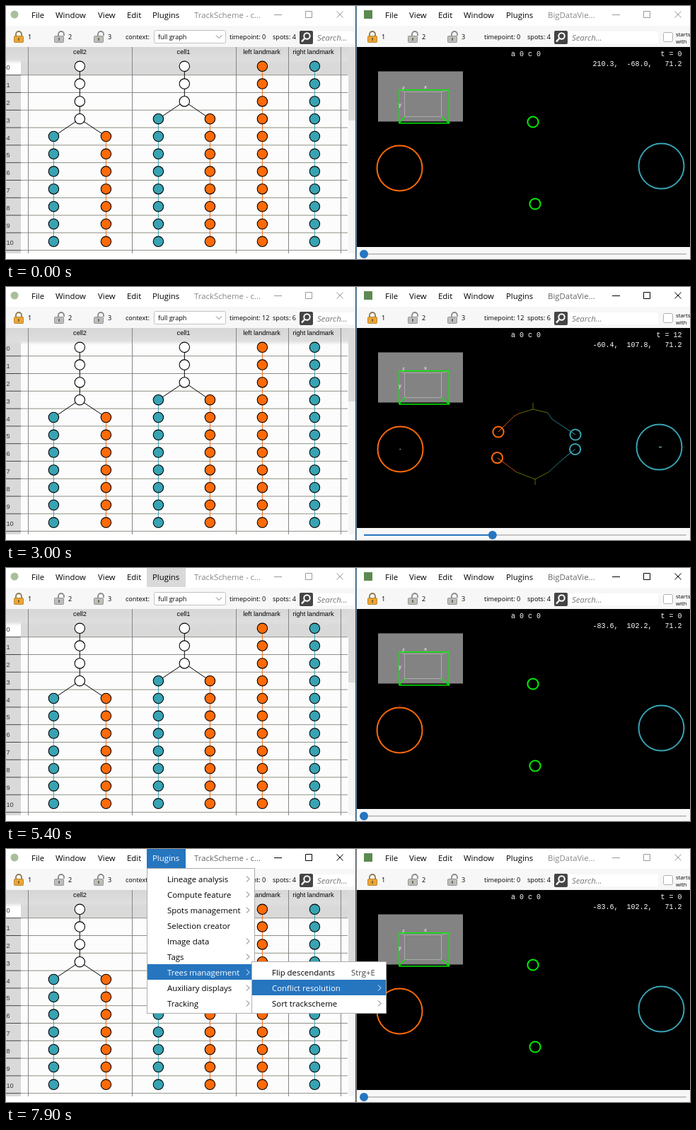
These frames come from a looping animation (967 px wide and 358 px high, 8 s). An HTML page:

```html
<!DOCTYPE html>
<html lang="en">
<head>
<meta charset="utf-8">
<title>Lineage tracking</title>
<style>
  html, body { margin: 0; width: 100%; height: 100%; overflow: hidden; background: #fff; }
  svg { display: block; width: 967px; height: 358px; font: 11.4px "Open Sans", sans-serif; }
  text { white-space: pre; }
  .tool { font-size: 9.1px; }
  .tiny { font-size: 7.8px; }
  .head { font: 9.2px "Liberation Sans", sans-serif; }
  .mono { font: 10px "Liberation Mono", monospace; fill: #fff; }
  .search { font-style: italic; font-size: 11.4px; fill: #757575; }
  .line { fill: none; }
</style>
</head>
<body>
<svg id="stage" viewBox="0 0 967 358" xmlns="http://www.w3.org/2000/svg"></svg>
<script>
const ORANGE = '#ff6a08', TEAL = '#38a3b3', GREEN = '#00f000', BLUE = '#2675bf';
const LOOP = 8000;

// Markup helpers
const rect = (x, y, w, h, fill, extra = '') =>
  `<rect x="${x}" y="${y}" width="${w}" height="${h}" fill="${fill}" ${extra}/>`;
const path = (d, stroke, width = 1, extra = '') =>
  `<path class="line" d="${d}" stroke="${stroke}" stroke-width="${width}" ${extra}/>`;
const text = (x, y, s, cls = '', extra = '') =>
  `<text x="${x}" y="${y}" class="${cls}" ${extra}>${s}</text>`;
const circle = (x, y, r, fill, stroke = 'none', width = 1) =>
  `<circle cx="${x}" cy="${y}" r="${r}" fill="${fill}" stroke="${stroke}" stroke-width="${width}"/>`;
const group = (id, body) => `<g id="${id}">${body}</g>`;
const centered = 'text-anchor="middle"';

// Window frame
function lock(x, closed) {
  const shackle = closed ? `M${x - 4} 43v-3a4 4 0 0 1 8 0v3` : `M${x - 1} 43v-3a4 4 0 0 1 8 0v2`;
  return path(shackle, closed ? '#8b7a50' : '#8a8a8a', 1.8) +
    rect(x - 6.5, 42.5, 13, 9, closed ? '#eda535' : '#bdbdbd',
      `rx="1" stroke="${closed ? '#a8761c' : '#858585'}" stroke-width=".8"`) +
    rect(x - .8, 45, 1.6, 4, '#6b5a38');
}

function controls(id, x) {
  return group(id, path(`M${x} 12.5h11M${x + 44.5} 7.5h9v9h-9zM${x + 88.5} 7.5l9 9m0-9l-9 9`, 'currentColor'));
}

function frame(x, menus, title, titleX, titleId) {
  const search = x ? 775 : 415;
  return menus.map(([mx, s]) => text(mx, 17, s)).join('') +
    text(titleX, 17, title, '', `id="${titleId}"`) +
    [18, 75, 131].map((lx, i) => lock(x + lx, i === 0) + text(x + lx + 13, 47, i + 1, 'tool')).join('') +
    rect(search + 19, 36, x ? 128 : 59, 17, '#fff') +
    rect(search, 35, 19, 19, '#454545', 'rx="2"') +
    circle(search + 10.5, 42.5, 4.2, 'none', '#fff', 2) +
    path(`M${search + 7} 46l-4 4.5`, '#fff', 2.4) +
    text(search + 25, 48.5, 'Search...', 'search');
}

// Lineage view geometry
const rowY = i => 85.3 + 24.8 * i;
const lineY = i => 97.7 + 24.8 * i;

function strand(x, from, to, fill, edge = fill) {
  let nodes = '';
  for (let i = from; i <= to; i++) nodes += circle(x, rowY(i), 7.2, fill, '#000', 1.1);
  return path(`M${x} ${rowY(from)}V${rowY(to)}`, edge) + nodes;
}

function tree(x, left, right, split) {
  const y = rowY(split);
  return path(`M${left} ${y}L${x} ${rowY(split - 1)}L${right} ${y}`, '#000') +
    strand(x, 0, split - 1, '#fff', '#000') +
    strand(left, split, 10, TEAL) + strand(right, split, 10, ORANGE);
}

function lineageView() {
  let lines = '', labels = '';
  for (let i = 0; i <= 10; i++) {
    lines += path(`M21 ${lineY(i)}H483`, '#8f8f86') + path(`M0 ${lineY(i)}H21`, '#444');
    labels += text(.5, rowY(i) + 5, i, 'head', 'fill="#333"');
  }
  const columns = [31.5, 178.5, 325.5, 399.5, 473.5];
  return `<g clip-path="url(#grid)">` +
    rect(0, 58, 484, 292, '#fcfcfc') + rect(0, 58, 21, 292, '#d9d9d9') +
    group('row', rect(21, 0, 463, 24.8, '#d9d9d9') + rect(0, 0, 21, 24.8, '#fff')) +
    lines + rect(0, 58, 484, 24, 'url(#fade)') +
    columns.map(x => path(`M${x} 58V350`, '#858585')).join('') + labels + '</g>' +
    text(104.5, 68, 'cell2', 'head', centered) + text(251, 68, 'cell1', 'head', centered) +
    text(361.5, 68, 'left landmark', 'head', centered) + text(434.5, 68, 'right landmark', 'head', centered) +
    tree(104.3, 67.4, 141.4, 4) + tree(252.3, 215.4, 288.4, 3) +
    strand(362.4, 0, 10, ORANGE) + strand(436.4, 0, 10, TEAL) +
    rect(484, 58, 10, 292, '#f5f5f5') + rect(484, 58, 10, 104, '#dadada');
}

function imageView() {
  return rect(496, 58, 471, 283, '#000') + rect(526, 92.5, 120, 71, '#838383') +
    path('M563.5 121.5h52v35h-52zM556 119l7.5 2.5M626 119l-10.5 2.5', '#b5b5b5', .8) +
    path('M555.5 118.8H626.5V165.7H555.5M555.5 166l8-9.5M626.5 166l-11-9.5', '#00f000', 1.5) +
    path('M555.5 118.8V165.7', '#00f000', .8) +
    text(560, 118, 'z', 'tiny', 'fill="#fff"') + text(591, 116.5, 'x', 'tiny', 'fill="#fff"') +
    text(555, 141.5, 'y', 'tiny', 'fill="#fff"') +
    text(714, 71, 'a 0 c 0', 'mono') +
    '<text id="time" class="mono" x="955.5" y="71" text-anchor="end"></text>' +
    '<text id="coords" class="mono" x="955.5" y="85" text-anchor="end"></text>' +
    '<g id="spots"></g>' +
    rect(496, 341, 471, 17, '#f7f7f7') + rect(506, 350, 456, 2, '#c4c4c4', 'rx="1"') +
    rect(506, 350, 0, 2, BLUE, 'id="fill"') + '<circle id="knob" cy="351" r="6" fill="#2675bf"/>';
}

// Menus
const items = ['Lineage analysis', 'Compute feature', 'Spots management', 'Selection creator', 'Image data',
  'Tags', 'Trees management', 'Auxiliary displays', 'Tracking'];
const subItems = ['Flip descendants', 'Conflict resolution', 'Sort trackscheme'];
const ROW = 22, MENU_TOP = 31, SUB_TOP = MENU_TOP + 6 * ROW;

function menu(id, list, x, y, w, h, textX, top, plain) {
  const rows = list.map((s, i) => {
    const rowTop = top + ROW * i, tip = x + w - 12;
    return `<g>${rect(x + 1, rowTop, w - 2, ROW, BLUE, 'visibility="hidden"')}` +
      text(textX, rowTop + 16, s) +
      (i === plain ? '' : path(`M${tip} ${rowTop + 7.5}l4 4l-4 4`, 'currentColor')) + '</g>';
  }).join('');
  return group(id, rect(x + .5, y + .5, w - 1, h - 1, '#fff', 'stroke="#aeaeae"') + rows);
}

const stage = document.getElementById('stage');
stage.innerHTML = `<defs>
  <clipPath id="grid"><rect y="58" width="484" height="292"/></clipPath>
  <linearGradient id="fade" x2="0" y2="1"><stop stop-color="#d6d6d6"/><stop offset=".75" stop-color="#dedede"/>
  <stop offset="1" stop-color="#dedede" stop-opacity="0"/></linearGradient></defs>` +
  rect(0, 0, 967, 358, '#fff') + rect(0, 28, 967, 30, '#f7f7f7') +
  rect(199, 0, 55, 27, BLUE, 'id="tab"') +
  frame(0, [[36, 'File'], [70, 'Window'], [130, 'View'], [171, 'Edit']], 'TrackScheme - c...', 266, 'titleA') +
  text(207, 17, 'Plugins', '', 'id="plugins"') +
  frame(500, [[536, 'File'], [570, 'View'], [611, 'Edit'], [647, 'Window'], [707, 'Plugins']],
    'BigDataVie...', 766, 'titleB') +
  circle(12, 12, 5.5, '#a9bf9c') + rect(506, 6, 12, 12, '#5d8a50') +
  controls('winA', 379) + controls('winB', 857) +
  text(169, 47, 'context:', 'tool') + rect(209.5, 34.5, 101, 18, '#fff', 'stroke="#c2c2c2" rx="2"') +
  text(215, 47, 'full graph', 'tool') + path('M297 41.5l4 4l4-4', '#777') +
  [316, 676].map(x => text(x, 47, '', 'tool step') + text(x + 61, 47, '', 'tool count')).join('') +
  rect(929.5, 37.5, 13, 13, '#fff', 'stroke="#b0b0b0" rx="2"') +
  text(947, 42.5, 'starts', 'tiny') + text(947, 53, 'with', 'tiny') +
  lineageView() + imageView() + rect(494, 0, 1.6, 358, '#1d4e74', 'id="edge"') +
  menu('menu', items, 199, 27, 153, 206, 228, MENU_TOP, 3) +
  menu('sub', subItems, 347, 159, 191, 74, 376, SUB_TOP, 0);

const $ = id => document.getElementById(id);
$('sub').children[1].insertAdjacentHTML('beforeend', text(488, SUB_TOP + 16, 'Strg+E', '', 'fill="#444"'));

// Moving spots: [time, x, y] waypoints
const cells = [
  { split: 2, trunk: [[0, 745, 164], [2, 745, 173]],
    left: [[2, 745, 173], [3, 725, 179], [4, 718, 183], [7, 706, 195], [15, 690, 211]],
    right: [[2, 745, 173], [3, 766, 178], [4, 772, 187], [7, 790, 199], [15, 814, 215]] },
  { split: 3, trunk: [[0, 748, 280], [3, 748, 272]],
    left: [[3, 748, 272], [4, 722, 262], [7, 707, 251], [15, 687, 236]],
    right: [[3, 748, 272], [4, 767, 262], [7, 789, 242], [15, 814, 222]] },
];

function at(points, t) {
  let i = 1;
  while (i < points.length - 1 && t > points[i][0]) i++;
  const [t0, x0, y0] = points[i - 1], [t1, x1, y1] = points[i];
  const f = Math.min(1, Math.max(0, (t - t0) / (t1 - t0)));
  return [x0 + (x1 - x0) * f, y0 + (y1 - y0) * f];
}

function trail(points, now, from, color) {
  let out = '';
  for (let t = from; t < now && t < points[points.length - 1][0]; t++) {
    const age = Math.min(1, Math.max(0, (now - t - 2) / 5));
    const isGreen = color === GREEN || t === points[0][0];
    const stroke = isGreen ? `rgb(${100 * age},${220 - 110 * age},0)` : color;
    out += path(`M${at(points, t)}L${at(points, t + 1)}`, stroke, 1, isGreen ? '' : `opacity="${1 - age * .3}"`);
  }
  return out;
}

function spots(t) {
  const moved = t >= 2;
  let out = circle(moved ? 557.5 : 556.5, 229.5, 32, 'none', ORANGE, 2) +
    circle(moved ? 923.5 : 926.5, 226.5, 32, 'none', TEAL, 2);
  if (moved) out += path('M556.5 229.5h1.5', '#ffc9a0') + path('M923 226.5h4', '#8cd3dc');
  for (const { split, trunk, left, right } of cells) {
    out += trail(trunk, t, 0, GREEN);
    if (t <= split) out += circle(...at(trunk, t), 7.6, 'none', GREEN, 2);
    else for (const [branch, color] of [[left, ORANGE], [right, TEAL]])
      out += trail(branch, t, split, color) + circle(...at(branch, t), 7.6, 'none', color, 2);
  }
  return out;
}

// Timeline
const pick = (steps, ms) => steps.reduce((value, [start, v]) => ms >= start ? v : value, steps[0][1]);
const peak = [[2300, 10], [2400, 11], [2600, 12], [2800, 13]];
const descent = [[3000, 12], [3100, 11], [3200, 9], [3300, 7], [3400, 5], [3500, 4], [3600, 3], [3700, 2], [3800, 1], [3900, 0]];
const timepoint = ms => ms < 1400 ? 0 : ms < 2300 ? Math.floor((ms - 1300) / 100)
  : pick([...peak, ...descent], ms);
const menuRow = [[0, -1], [6300, 0], [6400, 1], [6600, 2], [6700, 3], [6800, 4], [7000, 5], [7200, 6]];
const subRow = [[0, -1], [7800, 0], [7900, 1]];

function position(ms) {
  const part = (start, n) => Math.min(1, Math.max(0, (Math.floor((ms - start) / 100) + 1) / n));
  const a = part(100, 7), b = part(4600, 5), e = a * a * (3 - 2 * a);
  return [210.3 - 270.7 * e - 23.2 * b, -68 + 175.8 * e - 5.6 * b, 71.2];
}

function select(id, index) {
  [...$(id).children].slice(1).forEach((row, i) => {
    const on = i === index;
    row.firstChild.setAttribute('visibility', on ? 'visible' : 'hidden');
    row.setAttribute('fill', on ? '#fff' : '#000');
    row.style.color = on ? '#fff' : '#666';
  });
}

function activate(side, on) {
  $('win' + side).style.color = on ? '#000' : '#999';
  $('title' + side).setAttribute('fill', on ? '#666' : '#888');
}

const label = (cls, s) => stage.querySelectorAll(cls).forEach(e => { e.textContent = s; });

function draw(ms) {
  const t = timepoint(ms), open = ms >= 5700;
  $('row').setAttribute('transform', `translate(0 ${lineY(t - 1)})`);
  label('.step', `timepoint: ${t}`);
  label('.count', `spots: ${t < 3 ? 4 : t < 4 ? 5 : 6}`);
  $('time').textContent = `t = ${t}`;
  $('coords').textContent = position(ms).map(v => v.toFixed(1).padStart(6)).join(', ').trim();
  $('spots').innerHTML = spots(t);
  const x = 506 + 15.15 * t;
  $('knob').setAttribute('cx', x);
  $('fill').setAttribute('width', x - 506);

  activate('A', open);
  activate('B', ms >= 1300 && !open);
  $('edge').setAttribute('fill', open ? '#4a4f54' : '#1d4e74');
  $('tab').setAttribute('visibility', ms >= 5300 ? 'visible' : 'hidden');
  $('tab').setAttribute('fill', open ? BLUE : '#d9d9d9');
  $('plugins').setAttribute('fill', open ? '#fff' : '#000');
  $('menu').style.display = open ? '' : 'none';
  $('sub').style.display = ms >= 7400 ? '' : 'none';
  select('menu', pick(menuRow, ms));
  select('sub', pick(subRow, ms));
}

let last = -1;
const origin = performance.now();
function tick() {
  const slot = Math.floor((performance.now() - origin) % LOOP / 100);
  if (slot !== last) draw(slot * 100);
  last = slot;
  requestAnimationFrame(tick);
}
draw(0);
requestAnimationFrame(tick);
</script>
</body>
</html>
```
